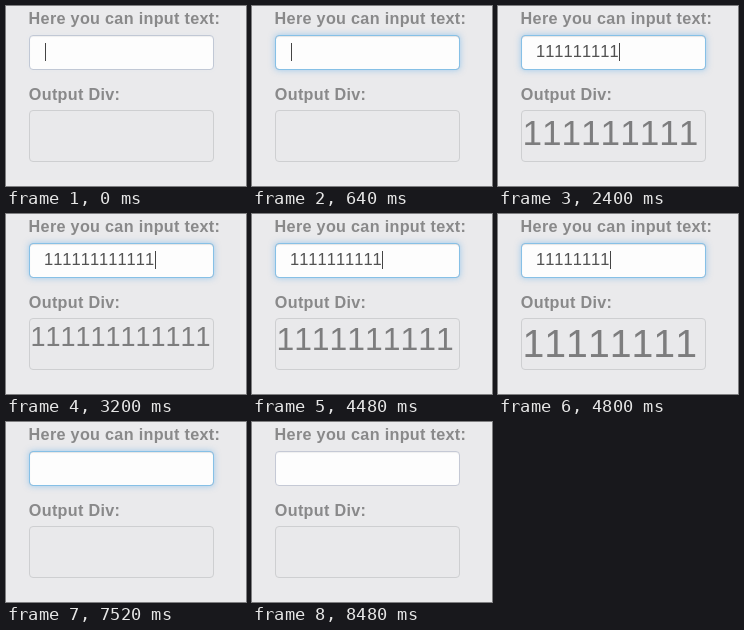
These frames come from a looping animation (240 by 180 pixels, 8.64 s). An HTML page:

```html
<!DOCTYPE html>
<html lang="en">
<head>
<meta charset="utf-8">
<title>Fitting text</title>
<style>
  html, body { margin: 0; width: 100%; height: 100%; overflow: hidden; background: #eaeaec; }
  body { position: relative; }
  .box { position: absolute; left: 23px; width: 185px; box-sizing: border-box; border: 1px solid; border-radius: 4px; }
  #field, #glow { top: 29px; height: 35px; }
  #field { background: #fdfdfd; border-color: #c5c9d5; box-shadow: inset 0 1px 1px rgba(0, 0, 0, .06); }
  #glow {
    border-color: #86c0e6;
    box-shadow: inset 0 1px 1px rgba(0, 0, 0, .04), 0 0 6px rgba(82, 168, 236, .5);
  }
  #panel { top: 104px; height: 52px; background: #e9e9eb; border-color: #cecfd1; }
  svg { position: absolute; left: 0; top: 0; width: 240px; height: 180px; }
  text { font-family: "Liberation Sans", Arial, sans-serif; font-kerning: none; }
  .label { font-size: 16.2px; font-weight: bold; letter-spacing: .3px; fill: #89898a; }
  #typed { font-size: 16.5px; fill: #525252; }
  #result { fill: #7d7d7e; }
</style>
</head>
<body>
<div class="box" id="field"></div>
<div class="box" id="glow"></div>
<div class="box" id="panel"></div>
<svg viewBox="0 0 240 180">
  <text class="label" x="22.6" y="17.6">Here you can input text:</text>
  <text class="label" x="22.8" y="94.2">Output Div:</text>
  <text id="typed" x="38" y="51.4"></text>
  <rect id="caret" y="37" width="1" height="18" fill="#444"></rect>
  <text id="result" x="24.4"></text>
</svg>
<script>
const LOOP = 8640, TICK = 160;
const $ = id => document.getElementById(id);
const glow = $("glow"), typed = $("typed"), caret = $("caret"), result = $("result");

// [tick, characters], each held until the next entry
const keys = [
  [0, 0], [5, 1], [7, 2], [8, 3], [9, 4], [10, 5], [11, 6], [12, 7], [14, 8],
  [15, 9], [16, 10], [17, 11], [18, 12],
  [28, 10], [29, 9], [30, 8], [31, 7], [32, 6], [33, 4], [34, 3], [35, 2], [36, 1], [37, 0]
];
// Near the end of the deletion the output trails the input by one tick
const lagFrom = 34;

const countAt = tick => keys.filter(k => k[0] <= tick).pop()[1];
const within = (tick, from, to) => tick >= from && tick < to;
const fitSize = n => n ? Math.min(48.8, (294 + 2.5 * n) / n) : 48.8;

function draw(tick) {
  const n = countAt(tick);
  const shown = countAt(tick < lagFrom ? tick : tick - 1);
  const focused = tick < 51;
  const blinkedOff = within(tick, 26, 28) || within(tick, 47, 51);

  glow.style.opacity = focused ? Math.min(1, .05 + tick * .6) : 0;
  typed.textContent = "1".repeat(n);
  caret.setAttribute("x", Math.floor(39 + 9.17 * n));
  caret.style.visibility = focused && !blinkedOff ? "visible" : "hidden";

  const size = fitSize(shown);
  result.textContent = "1".repeat(shown);
  result.style.fontSize = size + "px";
  result.setAttribute("y", 106.4 + .93 * size);
}

const start = performance.now();
function frame() {
  draw(Math.floor((performance.now() - start) % LOOP / TICK));
  requestAnimationFrame(frame);
}
frame();
</script>
</body>
</html>
```
